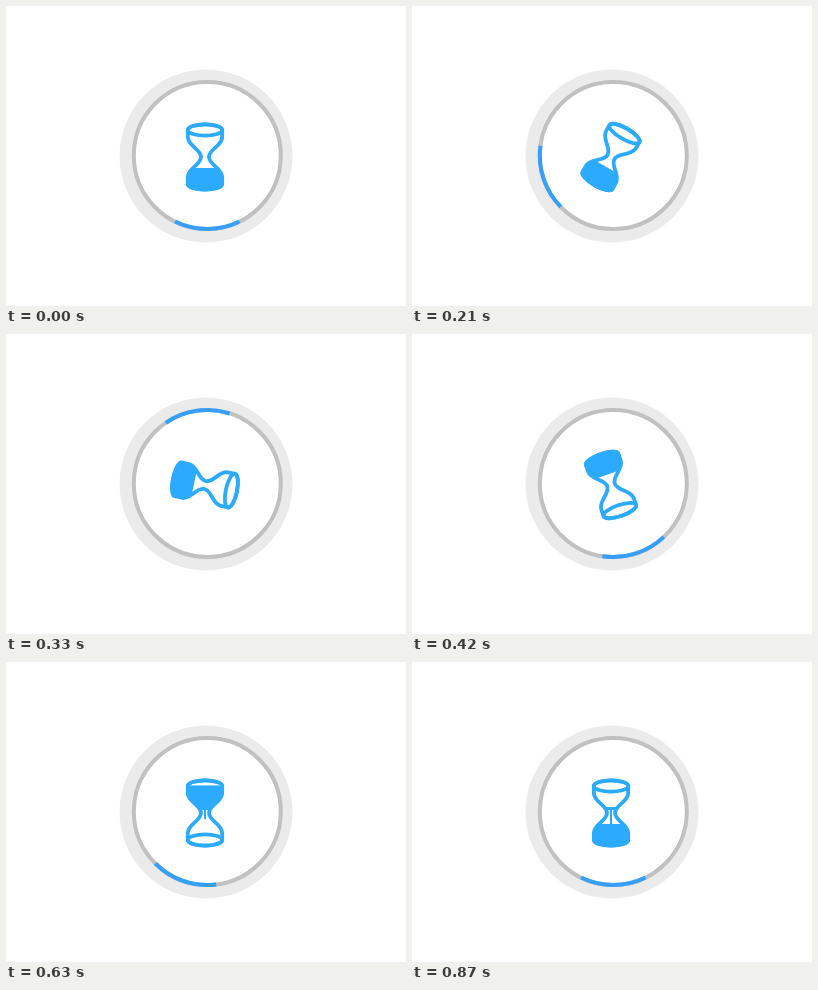
An HTML page that plays this animation: 400 by 300 pixels, repeating every 900 ms.

```html
<!DOCTYPE html>
<html lang="en">
<head>
<meta charset="utf-8">
<title>Hourglass loader</title>
<style>
  html, body { margin: 0; width: 100%; height: 100%; overflow: hidden; background: #fff; }
  svg { display: block; width: 100vw; height: 100vh; }
  .line { fill: none; stroke: #2caafd; stroke-width: 3.8; stroke-linejoin: round; }
  .sand { fill: #2caafd; }
</style>
</head>
<body>
<svg viewBox="0 0 400 300">
  <defs>
    <path id="glass" d="M-17.2-27V-20C-17.2-11-4-8-4 0C-4 8-17.2 11-17.2 20V27A17.2 5.6 0 0 0 17.2 27V20C17.2 11 4 8 4 0C4-8 17.2-11 17.2-20V-27A17.2 5.6 0 0 0-17.2-27Z"/>
    <clipPath id="inside"><use href="#glass"/></clipPath>
  </defs>
  <circle cx="200" cy="150" r="86.5" fill="#ebebeb"/>
  <g transform="translate(201.3 149.5)" fill="none" stroke-width="4">
    <circle r="73.5" fill="#fff" stroke="#c1c1c1"/>
    <path id="arc" stroke="#359ffa"/>
  </g>
  <g transform="translate(199 151)">
    <g id="hourglass">
      <g class="sand" clip-path="url(#inside)">
        <rect id="upper" x="-20" width="40"/>
        <rect id="stream" x="-1" y="-5" width="2"/>
        <rect id="lower" x="-20" width="40"/>
      </g>
      <g class="line">
        <use href="#glass"/>
        <ellipse cy="-27" rx="17.2" ry="5.6"/>
        <ellipse cy="27" rx="17.2" ry="5.6"/>
      </g>
    </g>
  </g>
</svg>
<script>
  const LOOP = 900, STEP = 30, POUR = 570;

  // Keys: [time in ms, degrees, degrees per ms]
  const arcKeys = [
    [0, 0, 0], [112, -38, 0], [210, 71.6, 2.4], [330, 531.7, 3], [510, 752, 0.3],
    [545, 757, 0], [630, 739, -0.35], [745, 709, 0], [870, 720, 0]
  ];
  const glassKeys = [
    [0, 0, 0], [112, -7.8, 0], [210, 30, 0.55], [330, 102, 0.62], [500, 187.5, 0], [570, 180, 0]
  ];

  const $ = id => document.getElementById(id);
  const arc = $('arc'), hourglass = $('hourglass');
  const upper = $('upper'), stream = $('stream'), lower = $('lower');

  const clamp = x => Math.min(1, Math.max(0, x));
  const mix = (a, b, k) => a + (b - a) * k;

  // Cubic Hermite curve through the keys
  function curve(keys, t) {
    const i = keys.findIndex(k => k[0] > t);
    if (i < 0) return keys[keys.length - 1][1];
    const [t0, a, va] = keys[i - 1], [t1, b, vb] = keys[i];
    const d = t1 - t0, u = (t - t0) / d, w = 1 - u;
    return w * w * (1 + 2 * u) * a + u * u * (3 - 2 * u) * b + d * u * w * (w * va - u * vb);
  }

  function span(rect, top, bottom) {
    rect.setAttribute('y', top);
    rect.setAttribute('height', Math.max(0, bottom - top));
  }

  function point(deg) {
    const a = deg * Math.PI / 180;
    return `${73.5 * Math.cos(a)} ${73.5 * Math.sin(a)}`;
  }
  arc.setAttribute('d', `M${point(64)}A73.5 73.5 0 0 1 ${point(116)}`);

  function draw(t) {
    const pouring = t >= POUR;
    arc.setAttribute('transform', `rotate(${curve(arcKeys, t)})`);
    hourglass.setAttribute('transform', `rotate(${pouring ? 0 : curve(glassKeys, t)})`);

    if (pouring) {
      const level = mix(34, 11, clamp((t - 630) / 240));
      span(upper, mix(-33, -6, (t - POUR) / 300), -3);
      span(stream, -5, Math.min(level, mix(-3, 34, clamp((t - 600) / 120))));
      span(lower, level, 36);
    } else {
      span(upper, 0, 0);
      span(stream, 0, 0);
      span(lower, 11, 36);
    }
  }

  function tick() {
    const t = (performance.now() + 0.5) % LOOP;
    draw(Math.floor(t / STEP) * STEP);
    requestAnimationFrame(tick);
  }
  tick();
</script>
</body>
</html>
```
